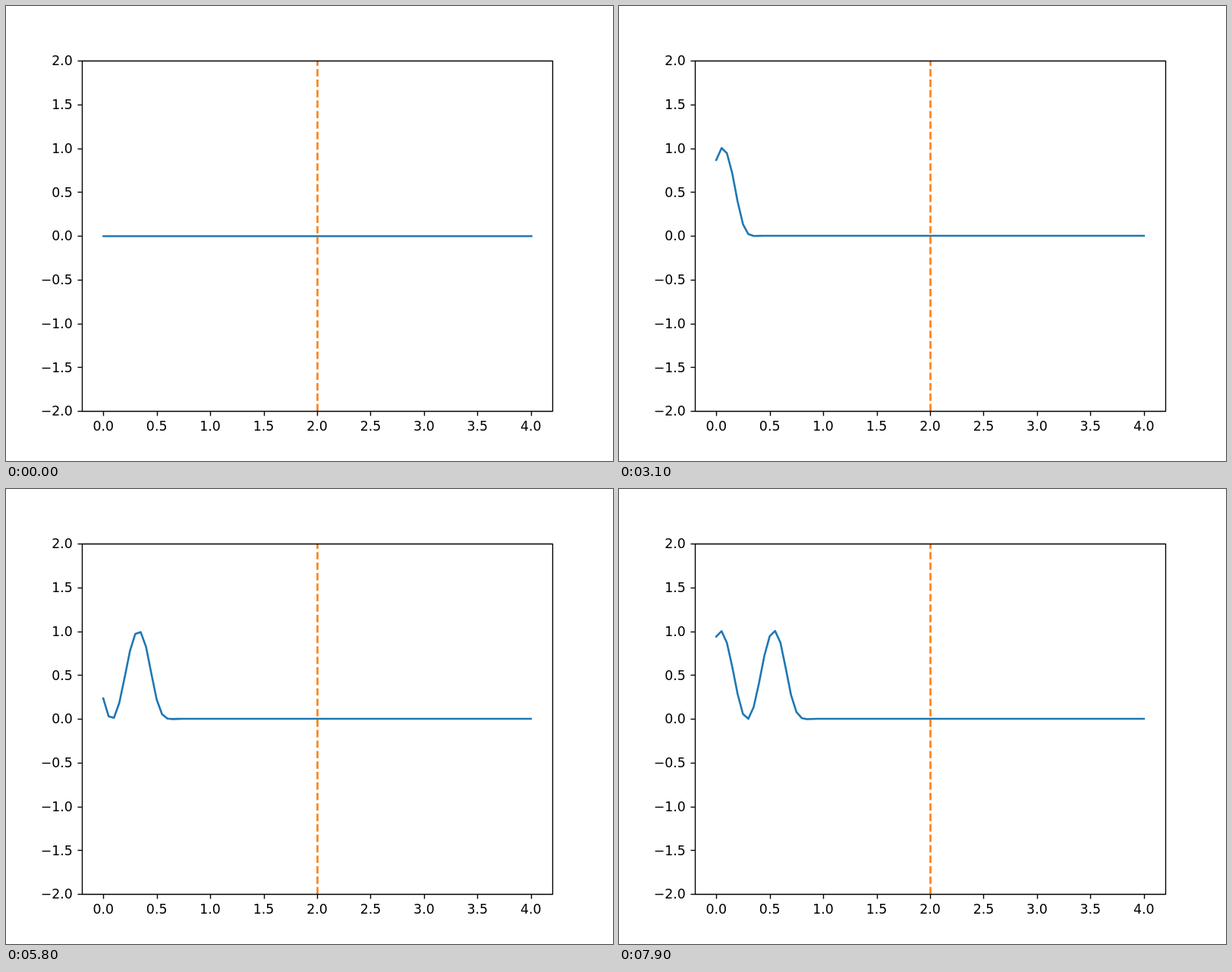
These frames come from a looping animation (800 px wide and 600 px high, 8 s). An HTML page with a canvas:

```html
<!DOCTYPE html>
<html lang="en">
<head>
<meta charset="utf-8">
<title>Driven wave</title>
<style>
html, body { margin: 0; width: 100%; height: 100%; overflow: hidden; background: #fff; }
canvas { display: block; }
</style>
</head>
<body>
<canvas width="800" height="600"></canvas>
<script>
const ctx = document.querySelector('canvas').getContext('2d');
const STEPS = 80, STEP_MS = 100, CELLS = 80, DX = 0.05, DT = 0.01;
const LEFT = 100, RIGHT = 720, TOP = 72, BOTTOM = 534;
const LINE = 1.5 * 125 / 72;

const px = x => LEFT + (x + 0.2) / 4.4 * (RIGHT - LEFT);
const py = y => (TOP + BOTTOM) / 2 - y / 4 * (BOTTOM - TOP);
const snap = v => Math.round(v) + 0.5;

// Wave equation, fourth order in space, driven at the left end.
function simulate() {
  const r2 = (DT / DX) ** 2;
  let old = new Float64Array(CELLS + 1), u = old;
  const rows = [u];
  for (let k = 1; k < STEPS; k++) {
    const next = new Float64Array(CELLS + 1);
    for (let i = 1; i < CELLS; i++) {
      const near = u[i - 1] + u[i + 1];
      const curve = i > 1 && i < CELLS - 1
        ? (16 * near - 30 * u[i] - u[i - 2] - u[i + 2]) / 12
        : near - 2 * u[i];
      next[i] = 2 * u[i] - old[i] + r2 * curve;
    }
    next[0] = Math.sin(2 * Math.PI * k * DT) ** 2;
    old = u;
    u = next;
    rows.push(u);
  }
  return rows;
}

function stroke(points, color, width, cap = 'butt', dash = []) {
  ctx.beginPath();
  points.forEach(([x, y]) => ctx.lineTo(x, y));
  ctx.strokeStyle = color;
  ctx.lineWidth = width;
  ctx.lineCap = cap;
  ctx.lineJoin = 'round';
  ctx.setLineDash(dash);
  ctx.stroke();
}

function drawAxes() {
  const thin = 0.8 * 125 / 72, tick = 6;
  ctx.fillStyle = '#000';
  ctx.font = '17.36px "DejaVu Sans", sans-serif';
  for (let i = 0; i <= 8; i++) {
    const x = i / 2, y = x - 2;
    const tx = snap(px(x)), ty = snap(py(y));
    stroke([[tx, BOTTOM + 0.5], [tx, BOTTOM + 0.5 + tick]], '#000', thin);
    stroke([[LEFT + 0.5, ty], [LEFT + 0.5 - tick, ty]], '#000', thin);
    ctx.textAlign = 'center';
    ctx.fillText(x.toFixed(1), px(x), 560);
    ctx.textAlign = 'right';
    ctx.fillText(y.toFixed(1).replace('-', '\u2212'), 87.85, Math.round(py(y) + 6.3));
  }
  ctx.strokeStyle = '#000';
  ctx.lineWidth = thin;
  ctx.strokeRect(LEFT + 0.5, TOP + 0.5, RIGHT - LEFT, BOTTOM - TOP);
}

const rows = simulate();

function draw(k) {
  ctx.fillStyle = '#fff';
  ctx.fillRect(0, 0, 800, 600);
  // The flat line at rest sits on the pixel grid.
  const wave = k
    ? Array.from(rows[k], (v, i) => [px(i * DX), py(v)])
    : [[128.5, 303.5], [692.5, 303.5]];
  stroke(wave, '#1f77b4', LINE, 'square');
  stroke([[410.5, BOTTOM + 0.5], [410.5, TOP + 0.5]], '#ff7f0e', LINE, 'butt',
    [3.7 * LINE, 1.6 * LINE]);
  drawAxes();
}

const start = performance.now();
function tick() {
  const t = Math.max(0, performance.now() - start);
  draw(Math.floor(t / STEP_MS) % STEPS);
  requestAnimationFrame(tick);
}
tick();
</script>
</body>
</html>
```
